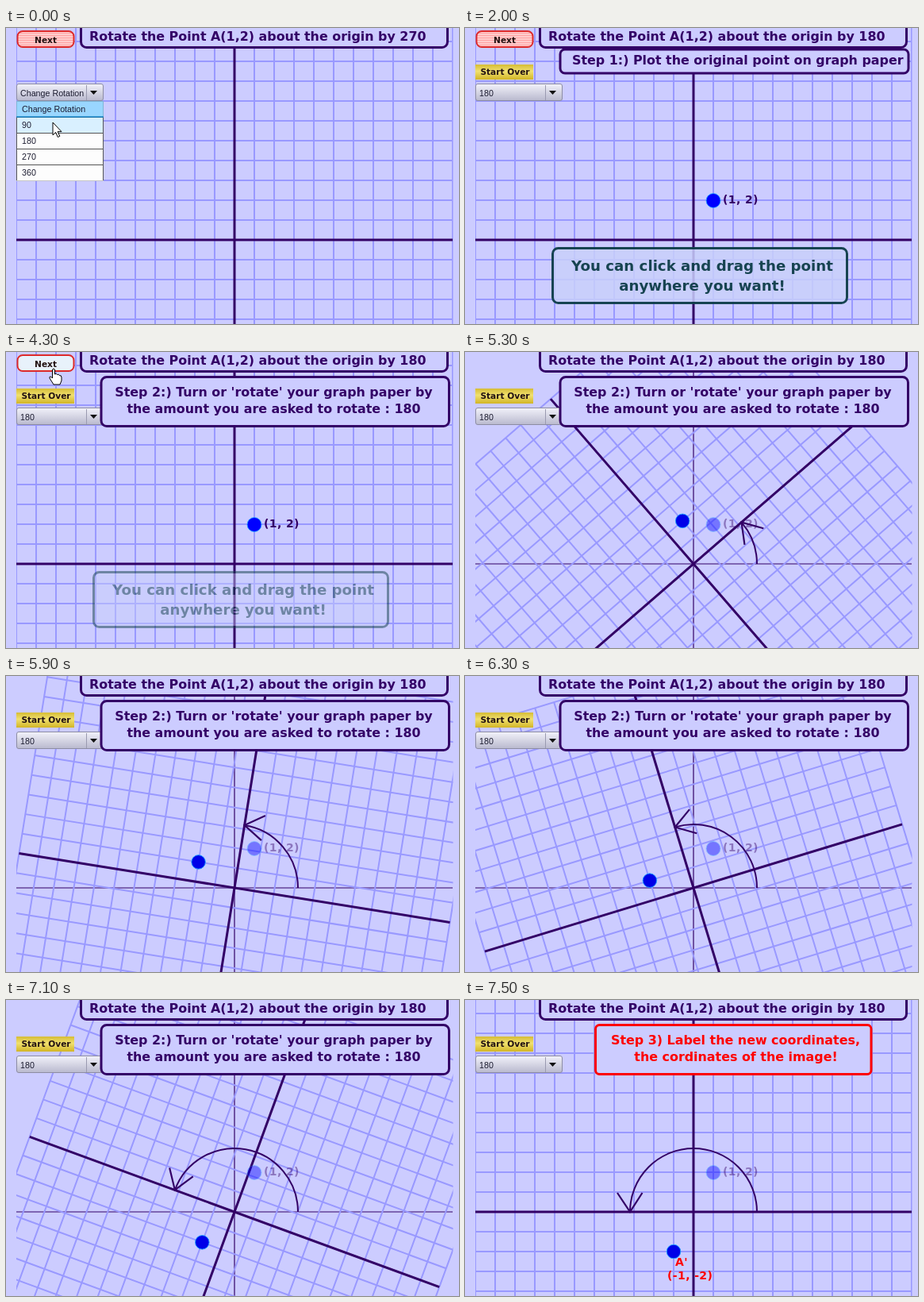
These frames come from a looping animation (571x373 px, 9000 ms). An HTML page:

```html
<!DOCTYPE html>
<html lang="en">
<head>
<meta charset="utf-8">
<title>Rotating a point about the origin</title>
<style>
  html, body { margin: 0; width: 100%; height: 100%; overflow: hidden; background: #ccccff; }
  svg { display: block; }
  text { font: bold 15.9px "DejaVu Sans", Verdana, sans-serif; fill: #330066; white-space: pre; }
  .mid { text-anchor: middle; }
  .coord { font-size: 14px; letter-spacing: .4px; }
  .button { font-size: 10.6px; fill: #221111; text-anchor: middle; }
  .combo { font: 10.7px "Liberation Sans", Arial, sans-serif; fill: #1c1c30; }
  .red text, text.red { fill: #ff0000; }
  .frame { fill: #ccccff; stroke: #330066; stroke-width: 3; }
  .red .frame { stroke: #ff0000; }
  #hint text { font-size: 18.2px; fill: #12404c; }
  #hint .frame { fill: #c9d0fb; fill-opacity: .88; stroke: #12404c; }
  .ink { fill: none; stroke: #330066; }
  .cursor { fill: #fff; stroke: #000; stroke-width: 1; stroke-linejoin: round; }
</style>
</head>
<body>
<svg width="571" height="373" viewBox="0 0 571 373">
  <defs>
    <clipPath id="stage"><path d="M13 0H563.5V373H13Z"/></clipPath>
    <pattern id="stripes" width="4" height="3" patternUnits="userSpaceOnUse">
      <path d="M0 0H4V3H0Z" fill="#ffcccc"/><path d="M0 .5H4" stroke="#ffa3a3"/>
    </pattern>
    <linearGradient id="gold" x2="0" y2="1">
      <stop stop-color="#d6bd35"/><stop offset=".45" stop-color="#f0e070"/><stop offset="1" stop-color="#d2b526"/>
    </linearGradient>
    <linearGradient id="steel" x2="0" y2="1">
      <stop stop-color="#f2f2fa"/><stop offset="1" stop-color="#b9b9ce"/>
    </linearGradient>
  </defs>

  <g clip-path="url(#stage)">
    <path id="thinAxes" class="ink" stroke-width="1.2" d="M13 267H563M288 0V373"/>
    <g id="paper">
      <path id="grid" fill="none" stroke="#9999ff" stroke-width="2"/>
      <path class="ink" stroke-width="3" d="M-275 0H275M0 -275V275"/>
    </g>
    <path id="arc" class="ink" stroke-width="2"/>
    <path id="arrowHead" class="ink" stroke-width="2.2" d="M96 24L80 0L64.5 24"/>
  </g>

  <g id="point">
    <circle cx="313" cy="217.500" r="9" fill="#0000ff" stroke="#22aaff" stroke-width=".8"/>
    <text class="coord" x="325" y="221">(1, 2)</text>
  </g>
  <circle id="image" r="8.800" fill="#0000e8" stroke="#22aaff" stroke-width=".9"/>
  <g id="imageLabel">
    <text class="coord red" x="265" y="335">A'</text>
    <text class="coord red" x="255" y="352">(-1, -2)</text>
  </g>

  <g id="hint">
    <rect class="frame" x="110.500" y="277.500" width="371" height="69" rx="7"/>
    <text class="mid" x="299" y="306">You can click and drag the point</text>
    <text class="mid" x="299" y="331">anywhere you want!</text>
  </g>

  <g id="combo">
    <rect x="13.500" y="70.500" width="109" height="21" rx="2.500" fill="url(#steel)" stroke="#8d8da3"/>
    <path d="M101.500 72V91" stroke="#9a9ab0"/>
    <path d="M106 79H115L110.500 84Z" fill="#111"/>
    <text id="choice" class="combo" x="18" y="86"></text>
  </g>
  <g id="list"></g>

  <g id="next">
    <rect id="nextFace" x="14.500" y="4" width="71" height="20" rx="6.500" stroke="#dd2a2a" stroke-width="2"/>
    <text class="button" x="50" y="19">Next</text>
  </g>
  <g id="restart">
    <rect x="13" y="46" width="73" height="19" fill="url(#gold)"/>
    <text class="button" x="50.500" y="59">Start Over</text>
  </g>

  <rect class="frame" x="94.500" y="-20" width="462" height="44.500" rx="7"/>
  <text id="title" x="105" y="16"></text>

  <g id="step1">
    <rect class="frame" x="120" y="27" width="439" height="30" rx="6"/>
    <text x="135" y="46">Step 1:) Plot the original point on graph paper</text>
  </g>
  <g id="step2">
    <rect class="frame" x="120" y="31.500" width="438.500" height="62" rx="7"/>
    <text class="mid" x="337.500" y="56">Step 2:) Turn or 'rotate' your graph paper by</text>
    <text class="mid" x="337.500" y="77">the amount you are asked to rotate : 180</text>
  </g>
  <g id="step3" class="red">
    <rect class="frame" x="164.500" y="31.500" width="347.500" height="62" rx="5"/>
    <text class="mid" x="341" y="56">Step 3) Label the new coordinates,</text>
    <text class="mid" x="341.500" y="77">the cordinates of the image!</text>
  </g>

  <path id="arrow" class="cursor" d="M0 0V16L3.700 12.500L6.300 18.500L8.800 17.400L6.200 11.600H11Z"/>
  <path id="hand" class="cursor" d="M-1.500 1Q0 -1 1.500 1V7Q3.500 5.500 4.500 7.500Q6.500 6.500 7.200 8.500Q10 8 10 11V15L8 20H0L-5 12Q-5.500 9.500 -3.500 10L-1.500 12Z"/>
</svg>
<script>
const LOOP = 9000, TICK = 100, ORIGIN = [288, 267];
const el = id => document.getElementById(id);

// Intervals in which each part is visible.
const shown = {
  list: [0, 700],
  next: [0, 4500],
  restart: [1600, LOOP],
  point: [1600, LOOP],
  hint: [1600, 4500],
  step1: [1600, 3300],
  step2: [3300, 7500],
  step3: [7500, LOOP],
  thinAxes: [4500, 7500],
  arc: [4500, LOOP],
  arrowHead: [4500, LOOP],
  image: [4500, LOOP],
  imageLabel: [7500, LOOP]
};
const turn = [[4680, 0], [5300, 40.9], [5900, 80.9], [6700, 133], [7400, 180]];
const pointer = [
  [[0, 59, 119], [500, 59, 139], [800, 59, 139], [1300, 60, 21], [1700, 60, 21], [1900, 12, 2]],
  [[2700, 18, 66], [3100, 60, 21], [4600, 60, 21]]
];
const hintAlpha = [[1700, 1], [2000, .97], [4300, .5]];

// Linear interpolation through rows of [time, value, ...].
function along(rows, t, column = 1) {
  const i = rows.findIndex(row => row[0] > t);
  if (i === 0) return rows[0][column];
  if (i < 0) return rows[rows.length - 1][column];
  const a = rows[i - 1], b = rows[i];
  return a[column] + (b[column] - a[column]) * (t - a[0]) / (b[0] - a[0]);
}

function show(id, on) { el(id).style.display = on ? "" : "none"; }

let lines = "";
for (let d = -275; d <= 275; d += 25) lines += `M${d} -275V275M-275 ${d}H275`;
el("grid").setAttribute("d", lines);

const options = ["Change Rotation", "90", "180", "270", "360"];
el("list").innerHTML = options.map((label, i) => {
  const y = 92 + i * 20;
  return `<rect x="13.5" y="${y + .5}" width="109" height="20" stroke="${i ? "#555" : "#7fb5d5"}"/>
    <text class="combo" x="20" y="${y + 14}">${label}</text>`;
}).join("") + '<path d="M13 192.500H123" stroke="#c5c5c5"/><path id="hoverEdge" stroke="#1686c8" stroke-width="1.500"/>';
const rows = el("list").querySelectorAll("rect");

function drawPointer(t) {
  const path = pointer.find(p => t >= p[0][0] && t < p[p.length - 1][0]);
  const x = path ? along(path, t, 1) : -99, y = path ? along(path, t, 2) : -99;
  const onNext = x > 14 && x < 86 && y > 3 && y < 25;
  const onRestart = t >= 1600 && x > 13 && x < 86 && y > 46 && y < 65;
  for (const id of ["arrow", "hand"]) {
    el(id).setAttribute("transform", `translate(${x} ${y})`);
    show(id, path && (id === "hand") === (onNext || onRestart));
  }
  el("nextFace").setAttribute("fill", onNext ? "#e8f2fb" : "url(#stripes)");

  const hovered = Math.floor((y - 92) / 20);
  rows.forEach((row, i) =>
    row.setAttribute("fill", i === 0 ? "#99d6ff" : i === hovered ? "#d9f0ff" : "#fdfdfd"));
  el("hoverEdge").setAttribute("d", `M13 ${92 + hovered * 20}H123`);
}

function drawTurn(t) {
  const angle = along(turn, t), rad = angle * Math.PI / 180;
  const polar = (r, a) => [ORIGIN[0] + r * Math.cos(a), ORIGIN[1] - r * Math.sin(a)];
  const paperAngle = t >= 7500 ? 0 : angle;
  const spin = a => `translate(${ORIGIN}) rotate(${-a})`;
  el("paper").setAttribute("transform", spin(paperAngle));
  el("arrowHead").setAttribute("transform", spin(angle));
  el("arc").setAttribute("d", `M368 267A80 80 0 0 0 ${polar(80, rad)}`);
  const [x, y] = polar(Math.hypot(25, 50), Math.atan2(50, 25) + rad);
  el("image").setAttribute("cx", x);
  el("image").setAttribute("cy", y);
}

function draw(t) {
  for (const id in shown) show(id, t >= shown[id][0] && t < shown[id][1]);
  const chosen = t >= 700;
  el("title").textContent = "Rotate the Point A(1,2) about the origin by " + (chosen ? 180 : 270);
  el("choice").textContent = chosen ? "180" : options[0];
  el("point").style.opacity = t >= 4500 ? .42 : 1;
  el("hint").style.opacity = along(hintAlpha, t);
  drawPointer(t);
  drawTurn(t);
}

function loop() {
  const t = performance.now() % LOOP;
  draw(Math.floor(t / TICK) * TICK);
  requestAnimationFrame(loop);
}
loop();
</script>
</body>
</html>
```
